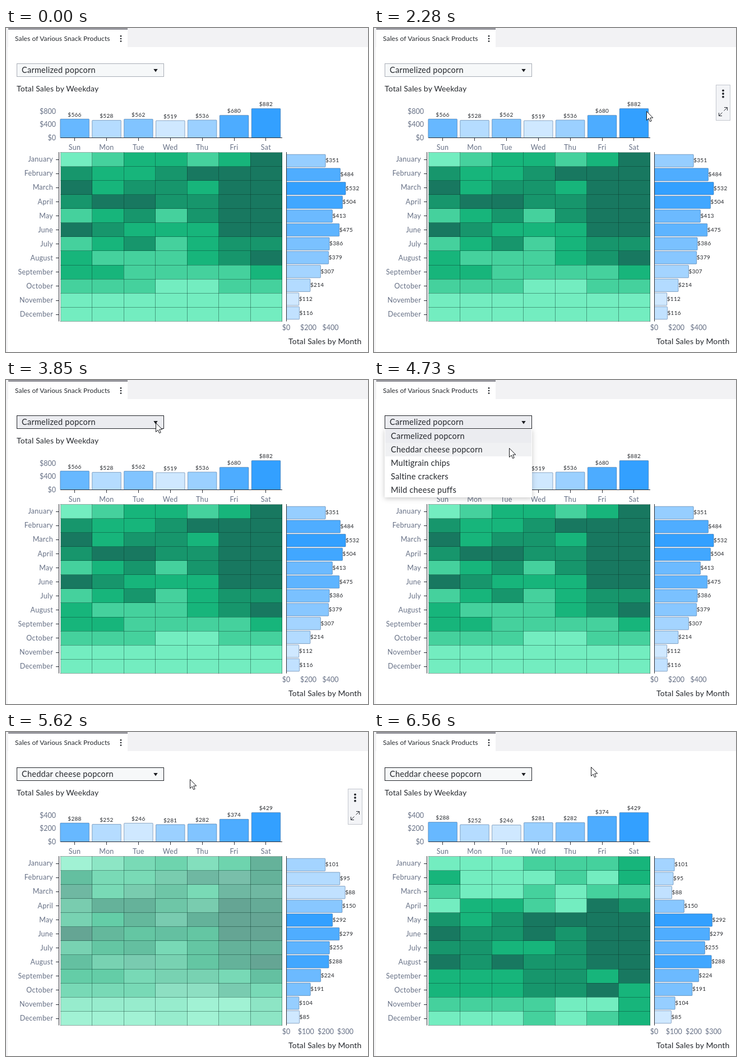
Animation, 646 px wide and 577 px high, one loop 8 s. Source, as an HTML page:

```html
<!DOCTYPE html>
<html lang="en">
<head>
<meta charset="utf-8">
<title>Snack sales dashboard</title>
<style>
  html, body { margin: 0; width: 100%; height: 100%; overflow: hidden; background: #fff; }
  svg { display: block; width: 646px; height: 577px; }
  text { font-family: Lato, "Open Sans", sans-serif; fill: #25282d; }
  .tab { font-size: 12px; letter-spacing: .12px; }
  .title { font-size: 14px; letter-spacing: .15px; }
  .item { font-size: 14.5px; letter-spacing: .25px; }
  .axis { font-size: 12.5px; letter-spacing: .3px; fill: #667085; }
  .num { letter-spacing: 0; }
  .value { font-size: 10px; letter-spacing: .3px; }
  .mid { text-anchor: middle; }
  .end { text-anchor: end; }
  .line { stroke: #2a2e36; fill: none; }
  .bar { stroke: rgba(30, 75, 125, .45); }
  .grid { stroke: rgba(8, 52, 40, .42); fill: none; }
  .list { filter: drop-shadow(0 2px 5px rgba(0, 0, 0, .22)); }
</style>
</head>
<body>
<svg id="stage" viewBox="0 0 646 577" xmlns="http://www.w3.org/2000/svg"></svg>
<script>
const LOOP = 8000;
const PRESS = 3850, OPEN = 3990, CLOSE = 5130, DATA = 5460, MORPH = 5540, MORPH_TIME = 1020;
const DAYS = ['Sun', 'Mon', 'Tue', 'Wed', 'Thu', 'Fri', 'Sat'];
const MONTHS = ['January', 'February', 'March', 'April', 'May', 'June', 'July',
  'August', 'September', 'October', 'November', 'December'];
const ITEMS = ['Carmelized popcorn', 'Cheddar cheese popcorn', 'Multigrain chips',
  'Saltine crackers', 'Mild cheese puffs'];
const GREENS = ['#73edc0', '#45d19d', '#17b57b', '#17966c', '#187860'];

const SETS = [
  {
    days: [566, 528, 562, 519, 536, 680, 882], dayUnit: .059, dayTicks: ['$0', '$400', '$800'],
    months: [351, 484, 532, 504, 413, 475, 386, 379, 307, 214, 112, 116], monthUnit: .1985,
    monthTicks: ['$0', '$200', '$400'], monthGap: 39.5,
    heat: '0122124 3223444 4233244 3443344 1231344 4322244 1231233 2111234 2211112 1110011 0000000 0000000'
  },
  {
    days: [288, 252, 246, 281, 282, 374, 429], dayUnit: .1215, dayTicks: ['$0', '$200', '$400'],
    months: [101, 95, 88, 150, 292, 279, 255, 288, 224, 191, 104, 85], monthUnit: .353,
    monthTicks: ['$0', '$100', '$200', '$300'], monthGap: 35.2,
    heat: '0001112 2000102 1001011 0221043 3234444 4334344 3322344 4343344 2223324 2223342 1111002 0001012'
  }
];

// time, x, y of the pointer tip
const PATH = [
  [500, 9, 200], [640, 70, 201], [780, 128, 202], [900, 165, 203], [1020, 181, 203], [1450, 181, 203],
  [1650, 228, 206], [1850, 310, 198], [2050, 410, 173], [2250, 487, 149], [2280, 486, 148],
  [2500, 452, 126], [2750, 398, 98], [2950, 354, 80], [3070, 340, 77], [3130, 333, 78],
  [3350, 292, 79], [3550, 262, 77], [3670, 267, 76], [4200, 267, 76],
  [4400, 260, 92], [4600, 246, 114], [4730, 241, 121], [5130, 241, 121],
  [5400, 254, 119], [5540, 286, 108], [5620, 328, 84], [5740, 366, 68], [5930, 387, 62]
];

const stage = document.getElementById('stage');

function add(parent, tag, attrs = {}, text) {
  const node = document.createElementNS('http://www.w3.org/2000/svg', tag);
  set(node, attrs);
  if (text !== undefined) node.textContent = text;
  parent.append(node);
  return node;
}
function set(node, attrs) {
  for (const key in attrs) node.setAttribute(key, attrs[key]);
}
const rect = (parent, x, y, width, height, fill, more = {}) =>
  add(parent, 'rect', { x, y, width, height, fill, ...more });
const path = (parent, d, cls) => add(parent, 'path', { d, class: cls });
const label = (parent, x, y, cls, text) => add(parent, 'text', { x, y, class: cls }, text);
const group = (parent = stage, attrs = {}) => add(parent, 'g', attrs);
const show = (node, on) => node.setAttribute('visibility', on ? 'visible' : 'hidden');
const mix = (a, b, k) => a + (b - a) * k;
const clamp = v => Math.max(0, Math.min(1, v));
const dots = (parent, cx, cy, gap, r) =>
  [-1, 0, 1].forEach(i => add(parent, 'circle', { cx, cy: cy + i * gap, r, fill: '#22252a' }));

function rankBlue(values, i) {
  const k = values.filter(v => v < values[i]).length / (values.length - 1);
  return `rgb(${[[207, 51], [232, 160], [255, 255]].map(([a, b]) => Math.round(mix(a, b, k)))})`;
}

// Page and tab
rect(stage, 0, 0, 646, 577, '#f2f2f4');
rect(stage, 3, 34, 643, 543, '#fff');
rect(stage, 4, 2, 213, 33, '#fff');
rect(stage, 4, 1, 213, 1.3, '#2b2b38');
label(stage, 16, 23, 'tab', 'Sales of Various Snack Products');
dots(stage, 205, 19, 4.6, 1.35);
label(stage, 19, 113, 'title', 'Total Sales by Weekday');
label(stage, 504, 563, 'title', 'Total Sales by Month');

// Heat map: two layers that cross-fade
const HEAT = { x: 97.5, y: 221.5, w: 56.43, h: 25.07 };
const heatLayers = SETS.map(({ heat }) => {
  const layer = group();
  heat.split(' ').forEach((row, j) => [...row].forEach((level, i) =>
    rect(layer, HEAT.x + i * HEAT.w, HEAT.y + j * HEAT.h, HEAT.w, HEAT.h, GREENS[level],
      { 'shape-rendering': 'crispEdges' })));
  return layer;
});
let gridLines = '';
for (let i = 0; i <= 7; i++) gridLines += `M${Math.floor(HEAT.x + i * HEAT.w) + .5} 221V523`;
for (let j = 0; j <= 12; j++) gridLines += `M97 ${Math.floor(HEAT.y + j * HEAT.h) + .5}H493`;
path(stage, gridLines, 'grid');

// Bars and axes
const dayX = i => 122.5 + i * 56.9;
const monthY = j => 236.4 + j * 24.65;
const makeBars = names => names.map(() => ({
  bar: add(stage, 'rect', { class: 'bar', rx: 1 }),
  text: add(stage, 'text', { class: 'value' })
}));
const dayBars = makeBars(DAYS), monthBars = makeBars(MONTHS);
dayBars.forEach(({ text }) => text.classList.add('mid'));

path(stage, 'M97 195.5H493', 'line');
path(stage, 'M94.5 221V522.5M500.5 221V522.5', 'line');
DAYS.forEach((name, i) => {
  path(stage, `M${Math.floor(dayX(i)) + .5} 196V201`, 'line');
  label(stage, dayX(i), 217, 'axis mid', name);
});
MONTHS.forEach((name, j) => {
  const y = 234 + j * 25.1;
  path(stage, `M89 ${Math.floor(y) + .5}H94`, 'line');
  label(stage, 84, y + 4.2, 'axis end', name);
});
const tickLayers = SETS.map(data => {
  const layer = group();
  data.dayTicks.forEach((s, i) => label(layer, 89, 200 - i * 23.7, 'axis num end', s));
  data.monthTicks.forEach((s, i) => label(layer, 500 + i * data.monthGap, 538, 'axis num mid', s));
  return layer;
});

// Chart toolbox
const toolbox = group();
rect(toolbox, 610.5, 101.5, 25, 63, '#f3f4f7', { stroke: '#c3c7ce' });
dots(toolbox, 623, 117, 5.7, 1.9);
path(toolbox, 'M624.5 147.5L630 142M621.5 150.5L616 156M625 141.5H630.5V147M615.5 151V156.5H621', 'line');

// Select field and list
const list = group();
rect(list, 19, 87, 263, 122, '#fff', { class: 'list' });
rect(list, 20, 88, 261, 24, '#ebecf0');
const hoverRow = rect(list, 20, 112, 261, 24, '#f0f1f3');
ITEMS.forEach((name, i) => label(list, 30, 105 + i * 24, 'item', name));
const field = rect(stage, 19.5, 63.5, 262, 23, '#f6f8f9');
const choice = label(stage, 28, 80, 'item', '');
add(stage, 'path', { d: 'M263.3 73H270.7L267 78.6Z', fill: '#1d1f23' });

const pointer = add(stage, 'path', {
  d: 'M.5 .5V16.5L4.2 13L6.6 18.6L9.2 17.5L6.8 12H11.8Z',
  fill: '#fff', stroke: '#16181c', 'stroke-linejoin': 'round'
});

function pointerAt(t) {
  const next = PATH.findIndex(p => p[0] > t);
  if (next < 0) return PATH[PATH.length - 1].slice(1);
  if (next === 0) return PATH[0].slice(1);
  const a = PATH[next - 1], b = PATH[next];
  const k = (t - a[0]) / (b[0] - a[0]);
  return [mix(a[1], b[1], k), mix(a[2], b[2], k)];
}

function drawBars(t) {
  const p = clamp((t - MORPH) / MORPH_TIME);
  const ease = p < .5 ? 2 * p * p : 1 - 2 * (1 - p) ** 2;
  const [before, after] = SETS;
  const current = t < DATA ? before : after;
  dayBars.forEach(({ bar, text }, i) => {
    const h = mix(before.days[i] * before.dayUnit, after.days[i] * after.dayUnit, ease);
    set(bar, { x: dayX(i) - 25.7, y: 195.5 - h, width: 51.6, height: h, fill: rankBlue(current.days, i) });
    set(text, { x: dayX(i), y: 191.3 - h });
    text.textContent = '$' + current.days[i];
  });
  monthBars.forEach(({ bar, text }, j) => {
    const w = mix(before.months[j] * before.monthUnit, after.months[j] * after.monthUnit, ease);
    set(bar, { x: 500.5, y: monthY(j) - 11.2, width: w, height: 22.4, fill: rankBlue(current.months, j) });
    set(text, { x: 500.5 + w, y: monthY(j) + 3 });
    text.textContent = '$' + current.months[j];
  });
}

function update(t) {
  drawBars(t);
  const fade = 1 - (1 - clamp((t - MORPH) / MORPH_TIME)) ** 3;
  heatLayers[0].setAttribute('opacity', (1 - fade) ** 2.3);
  heatLayers[1].setAttribute('opacity', fade);
  tickLayers.forEach((layer, i) => show(layer, (t >= DATA) === (i === 1)));

  const [x, y] = pointerAt(t);
  show(pointer, t >= 500);
  pointer.setAttribute('transform', `translate(${Math.round(x)} ${Math.round(y)})`);
  show(toolbox, (t >= 560 && t < 2800) || (t >= CLOSE && t < 5700));

  const open = t >= OPEN && t < CLOSE;
  show(list, open);
  show(hoverRow, open && y > 112);
  set(field, {
    fill: t >= PRESS && t < CLOSE ? '#ebecf0' : '#f6f8f9',
    stroke: t >= PRESS ? '#22252a' : '#a9aeb7'
  });
  choice.textContent = ITEMS[t < CLOSE ? 0 : 1];
}

const start = performance.now();
function frame() {
  update((performance.now() - start) % LOOP);
  requestAnimationFrame(frame);
}
frame();
</script>
</body>
</html>
```
